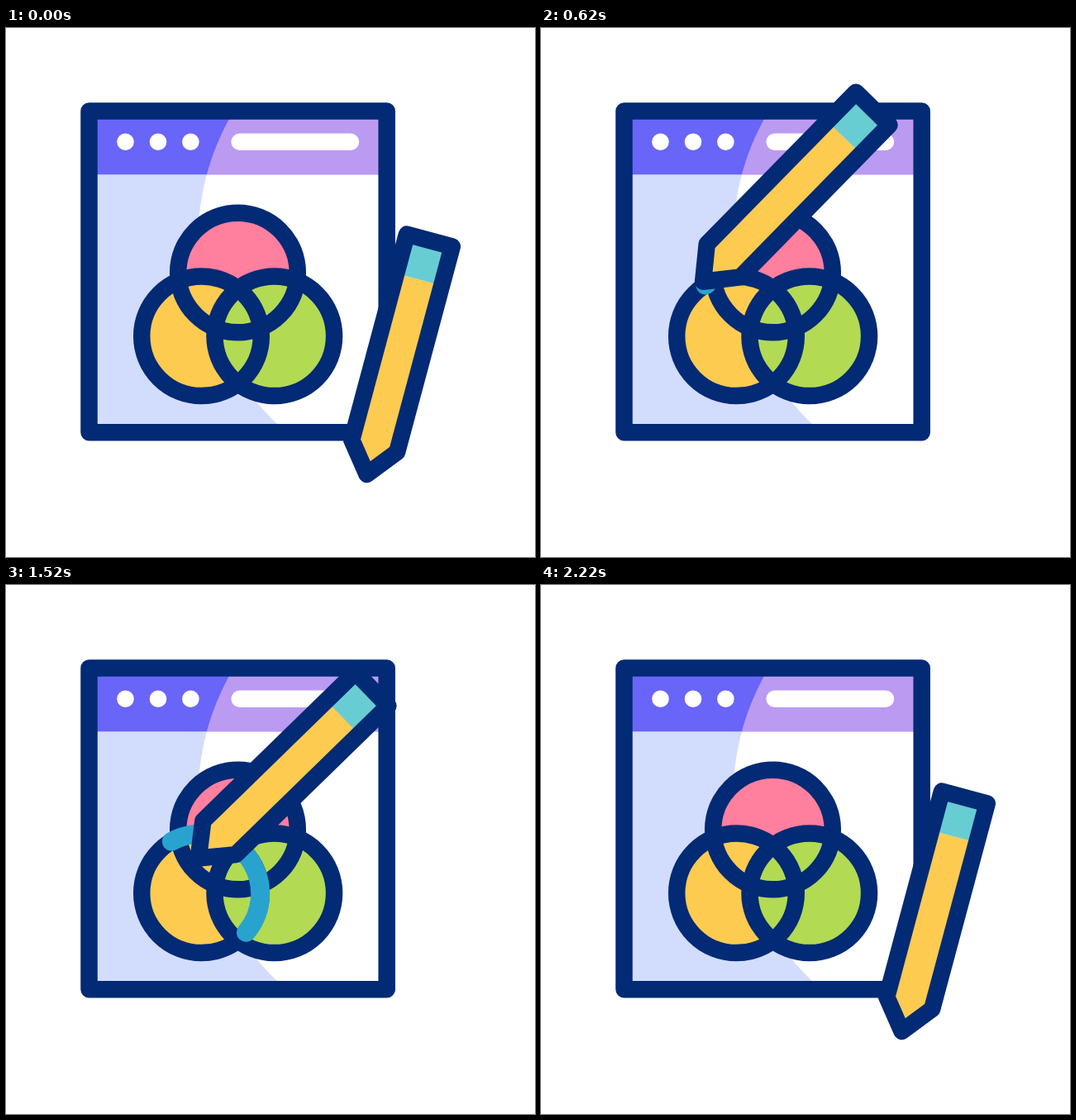
An HTML page for the animation above (2.4 s loop, 640 px wide and 640 px high).

```html
<!DOCTYPE html>
<html lang="en">
<head>
<meta charset="utf-8">
<title>Design window</title>
<style>
  html, body { margin: 0; width: 100%; height: 100%; overflow: hidden; background: #fff; }
  svg { display: block; width: 100vw; height: 100vh; }
  .line { fill: none; stroke: #022a75; stroke-width: 20.5; stroke-linejoin: round; }
</style>
</head>
<body>
<svg viewBox="0 0 640 640">
  <defs>
    <clipPath id="pane"><rect x="100" y="100" width="361" height="389"/></clipPath>
  </defs>
  <g clip-path="url(#pane)">
    <rect x="100" y="100" width="361" height="389" fill="#d2dcfd"/>
    <circle cx="537.8" cy="257" r="305.5" fill="#fff"/>
  </g>
  <clipPath id="bar"><rect x="100" y="100" width="361" height="77.3"/></clipPath>
  <g clip-path="url(#bar)">
    <rect x="100" y="100" width="361" height="78" fill="#6865f8"/>
    <circle cx="537.8" cy="257" r="305.5" fill="#bb9af2"/>
  </g>
  <g fill="#fff">
    <circle cx="144.5" cy="137.8" r="10.3"/>
    <circle cx="184" cy="137.8" r="10.3"/>
    <circle cx="223.4" cy="137.8" r="10.3"/>
    <rect x="272.4" y="127.4" width="154.8" height="20.7" rx="10.35"/>
  </g>
  <rect class="line" x="100.5" y="100.5" width="360.2" height="388.8"/>

  <circle cx="280.5" cy="296" r="72.3" fill="#ff7f9f"/>
  <circle cx="236.5" cy="372.8" r="72.3" fill="#fdcb50"/>
  <circle cx="324.8" cy="372.8" r="72.3" fill="#b2da53"/>
  <g class="line">
    <circle cx="280.5" cy="296" r="72.3"/>
    <circle cx="236.5" cy="372.8" r="72.3"/>
    <circle cx="324.8" cy="372.8" r="72.3"/>
  </g>

  <path id="ink" transform="translate(236.5 372.8)" pathLength="360" fill="none"
    stroke="#28a3cf" stroke-width="23" stroke-linecap="round"
    d="M-36.15 -62.6A72.3 72.3 0 0 0 36.15 62.6A72.3 72.3 0 0 0 -36.15 -62.6"/>

  <g id="pencil">
    <path fill="#fdcb50" d="M0 0L-28.4 -35.5V-244H28.4V-35.5Z"/>
    <path fill="#67cdd3" d="M-28.4 -244V-293H28.4V-244Z"/>
    <path class="line" d="M0 0L-28.4 -35.5V-293H28.4V-35.5Z"/>
  </g>
</svg>
<script>
const LOOP = 2400;
const ink = document.getElementById('ink');
const pencil = document.getElementById('pencil');

// Tip keys: time, x, y, speed x, speed y (px per ms)
const enter = [[200, 436.5, 540, 0, 0], [400, 292, 392, -.2, -.2], [600, 197, 305.5, 0, 0]];
const leave = [[1200, 212, 300, 0, 0], [1780, 287.5, 391, .29, .28], [2200, 436.5, 540, 0, 0]];
// Tilt keys: time, degrees
const tilt = [[200, 15], [400, 44.7], [600, 44.7], [860, 30.5], [1030, 47],
              [1200, 47], [1740, 45], [1790, 45], [2190, 15]];

const clamp = v => Math.min(1, Math.max(0, v));
const ease = (t, a, b) => { const k = clamp((t - a) / (b - a)); return k * k * (3 - 2 * k); };

function segment(keys, t) {
  let i = 0;
  while (i < keys.length - 2 && t >= keys[i + 1][0]) i++;
  return [keys[i], keys[i + 1]];
}

function glide(keys, t) {
  const [a, b] = segment(keys, t);
  const span = b[0] - a[0], k = clamp((t - a[0]) / span), s = k * k * (3 - 2 * k);
  const out = k * (1 - k) * (1 - k) * span, back = k * k * (k - 1) * span;
  return [1, 2].map(n => a[n] + (b[n] - a[n]) * s + a[n + 2] * out + b[n + 2] * back);
}

function trace(t) {
  const v = ease(t, 600, 1200);
  const angle = (240 - 348.5 * v - 17 * Math.sin(Math.PI * v)) * Math.PI / 180;
  const r = 72.2 + 5.2 * Math.cos(2 * Math.PI * v);
  return [236.5 + r * Math.cos(angle), 372.8 + r * Math.sin(angle)];
}

function draw(t) {
  const [x, y] = t < 600 ? glide(enter, t) : t < 1200 ? trace(t) : glide(leave, t);
  const [a, b] = segment(tilt, t);
  const turn = a[1] + (b[1] - a[1]) * ease(t, a[0], b[0]);
  pencil.setAttribute('transform', `translate(${x} ${y}) rotate(${turn})`);

  const from = 360 * ease(t, 1200, 1800), to = 360 * ease(t, 600, 1200);
  ink.style.visibility = to > from ? 'visible' : 'hidden';
  ink.setAttribute('stroke-dasharray', `${to - from} 720`);
  ink.setAttribute('stroke-dashoffset', -from);
}

const start = performance.now();
function tick() {
  draw((performance.now() - start) % LOOP);
  requestAnimationFrame(tick);
}
tick();
</script>
</body>
</html>
```
